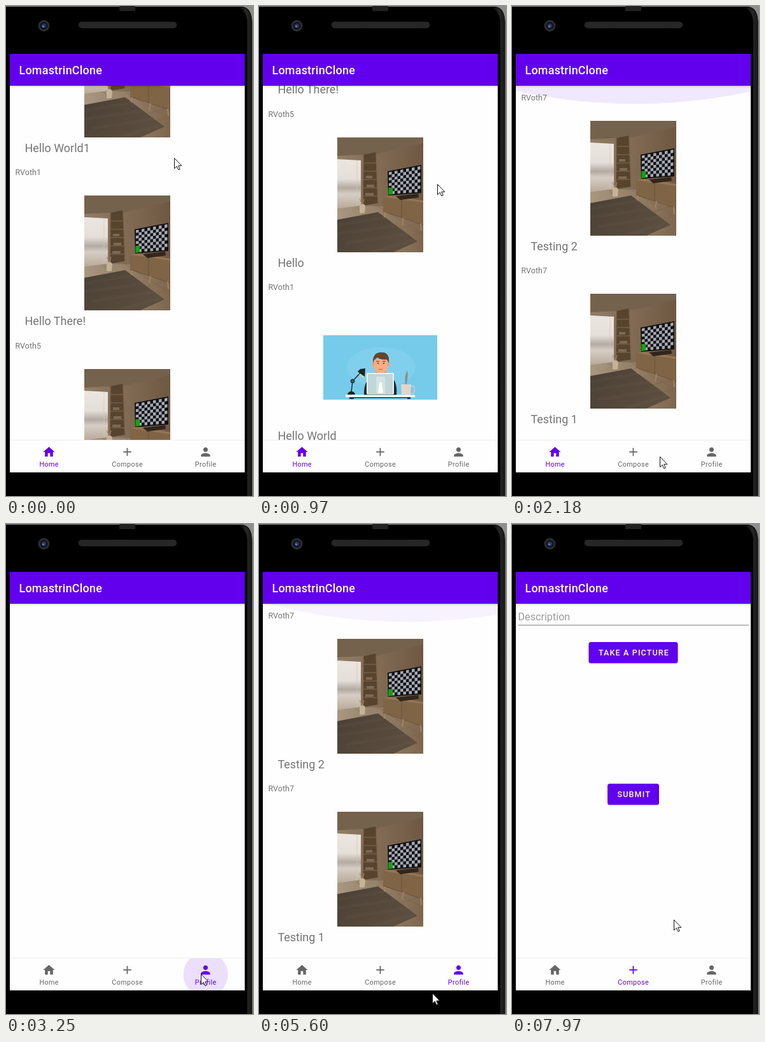
Animation, 388 px wide and 768 px high, one loop 8 s. Source, as an HTML page:

```html
<!DOCTYPE html>
<html lang="en">
<head>
<meta charset="utf-8">
<title>Phone feed</title>
<style>
html, body { margin: 0; width: 100%; height: 100%; overflow: hidden; background: #000; }
svg { display: block; }
text { font-family: Roboto, sans-serif; fill: #757575; }
.user { font-size: 12.57px; }
.desc { font-size: 17.95px; }
.label { font-size: 10.8px; letter-spacing: .36px; text-anchor: middle; fill: inherit; }
.btn { font-size: 12.57px; font-weight: 500; letter-spacing: 1.12px; fill: #fff; }
</style>
</head>
<body>
<svg id="stage" width="388" height="768" viewBox="0 0 388 768">
  <defs>
    <clipPath id="listClip"><rect x="6" y="125" width="369" height="556"/></clipPath>
    <clipPath id="navClip"><rect x="6" y="681" width="369" height="50"/></clipPath>
    <clipPath id="roomClip"><rect width="135" height="180"/></clipPath>
    <linearGradient id="wall"><stop offset="0" stop-color="#927d66"/><stop offset="1" stop-color="#6f5842"/></linearGradient>
    <linearGradient id="sky" x2="0" y2="1">
      <stop offset="0" stop-color="#ebe6df"/><stop offset=".4" stop-color="#e4dfd8"/>
      <stop offset=".58" stop-color="#b3aaa1"/><stop offset=".7" stop-color="#d6cec5"/><stop offset="1" stop-color="#b8a997"/>
    </linearGradient>
    <linearGradient id="floor"><stop offset="0" stop-color="#a99780"/><stop offset="1" stop-color="#7e664e"/></linearGradient>
    <linearGradient id="rug" x2="1" y2=".4"><stop offset="0" stop-color="#4a4035"/><stop offset="1" stop-color="#5c4e3f"/></linearGradient>
    <linearGradient id="edge"><stop offset="0" stop-color="#000"/><stop offset=".6" stop-color="#272727"/><stop offset="1" stop-color="#161616"/></linearGradient>
    <linearGradient id="shade" x2="0" y2="1"><stop offset="0" stop-opacity=".16"/><stop offset="1" stop-opacity="0"/></linearGradient>
    <pattern id="mesh" width="4" height="4" patternUnits="userSpaceOnUse">
      <rect width="4" height="4" fill="#2b2b2b"/><circle cx="1" cy="1" r=".7" fill="#111"/><circle cx="3" cy="3" r=".7" fill="#111"/>
    </pattern>

    <g id="room" clip-path="url(#roomClip)">
      <rect width="135" height="180" fill="url(#wall)"/>
      <path d="M0 0H135V9L64 26 0 29Z" fill="#75624d"/>
      <path d="M0 34L37 36V107L0 112Z" fill="url(#sky)"/>
      <path d="M31 36V107" stroke="#cfc6bc" stroke-width=".7"/>
      <path d="M41 27L61 23 64 103 40 107Z" fill="#57442f"/>
      <path d="M42 40H61M42 53H62M41 66H62M41 79H63M41 92H63" stroke="#86694c"/>
      <path d="M41 27L40 107M61 23L64 103" stroke="#806449" stroke-width="1.5"/>
      <path d="M45 62h10M46 76h12M44 89h13" stroke="#7b6a56" stroke-width="4"/>
      <path d="M0 112L40 107 72 108 135 135V180H0Z" fill="url(#floor)"/>
      <path d="M64 108L135 152M30 109L96 180M98 143L135 132M110 155L135 148" stroke="#786149" stroke-width=".6"/>
      <path d="M0 129L64 117 126 163 88 180H0Z" fill="url(#rug)"/>
      <path d="M0 138L75 125M0 151L95 138M12 166L110 151M54 180L121 160" stroke="#75665422" stroke-width="5"/>
      <path d="M72 93L84 91 135 99V136L130 134 72 116Z" fill="#7f6446"/>
      <path d="M72 93L84 91 135 99V102Z" fill="#957654"/>
      <path d="M101 97V126M72 116L135 137" stroke="#624a32" stroke-width=".8"/>
      <path d="M75 117L74 125M104 126L102 137M131 135L132 146" stroke="#a3845f" stroke-width="2"/>
      <path d="M35 108q0-4 4-4t5 4l-1 10q-4 2-8 0z" fill="#c5b398"/>
      <path d="M39 105L35 96M40 105L42 96" stroke="#a18b70"/>
      <path d="M92 92L127 88 128 94 99 98Z" fill="#30261d"/>
      <path d="M79 53L132 43V87L80 91Z" fill="#111"/>
      <path id="checks" fill="#a5a9b6"/>
      <path d="M80.500 79L87 78.500V89L80.500 90Z" fill="#12a512"/>
    </g>

    <g id="worker">
      <rect width="179" height="101" fill="#76cbea"/>
      <ellipse cx="91" cy="50" rx="54" ry="31" fill="#80d0ed"/>
      <path d="M64 94Q63 69 80 63L90 60 102 63Q117 68 115 94Z" fill="#24252b"/>
      <path d="M82 60L90 66 99 60V53H82Z" fill="#e99468"/>
      <path d="M79 37H102V49Q100 59 90 60 81 59 79 48Z" fill="#f8ad83"/>
      <circle cx="79" cy="46" r="2.500" fill="#f3a176"/><circle cx="102" cy="46" r="2.500" fill="#f3a176"/>
      <path d="M78 44Q77 29 88 27 101 25 103 36V44L100 38Q91 39 85 35L80 39Z" fill="#65452f"/>
      <path d="M83 41h5M93 41h5" stroke="#5a3b29"/>
      <circle cx="86" cy="44" r="1" fill="#2a2a2a"/><circle cx="95" cy="44" r="1" fill="#2a2a2a"/>
      <path d="M87 53q3 2 6 0" stroke="#b55b45" fill="none"/>
      <rect x="68" y="59" width="43" height="34" rx="2" fill="#edf4f4"/>
      <rect x="70" y="61" width="39" height="32" rx="1" fill="#c0d6d8"/>
      <path d="M83 65H97V91H83Z" fill="#d3e4e5"/>
      <path d="M86 91L88 75Q90 72 92 75L94 91Z" fill="#fff"/>
      <rect x="35" y="93.500" width="109" height="3.500" fill="#fff"/>
      <path d="M41 97H137V100H132V98.500H48V100H41Z" fill="#26323b"/>
      <path d="M38 93Q39 88 44 88T50 93Z" fill="#222"/>
      <path d="M44 89L46 72 59 58" stroke="#222" stroke-width="1.500" fill="none"/>
      <circle cx="46" cy="72" r="3" fill="#31566a" stroke="#222"/>
      <path d="M54 57L58 53 66 52 65 65Z" fill="#222"/>
      <path d="M55 60L64 65 62 67Z" fill="#f6d680"/>
      <path d="M129 78Q127 63 132 55 134 65 130 78Z" fill="#8a8d8b"/>
      <path d="M138 80h3q2 0 2 3v6q0 2-5 2" fill="none" stroke="#dbcabe" stroke-width="1.500"/>
      <path d="M122 77H138L137 93H123Z" fill="#e4d5ca"/>
    </g>
  </defs>

  <rect width="388" height="768" fill="#8d8d8d"/>
  <path d="M0 1H372Q386 4 386.500 24V768H0Z"/>
  <path d="M370 1Q386 5 386.500 26V768H379V26Q379 9 364 1Z" fill="url(#edge)"/>
  <rect x="178" width="25" height="8" rx="1" fill="#222"/>
  <circle cx="59.500" cy="31" r="9" fill="#2d2d2e"/>
  <circle cx="59.500" cy="31" r="6" fill="#11131d"/>
  <circle cx="59.500" cy="31" r="3.600" fill="#253465"/>
  <circle cx="58.500" cy="32" r="1.400" fill="#7187c9"/>
  <rect x="114" y="25" width="154" height="9.500" rx="4.700" fill="url(#mesh)" stroke="#333" stroke-width=".5"/>

  <rect x="6" y="75" width="369" height="656" fill="#fefefe"/>
  <g clip-path="url(#listClip)">
    <g id="list"></g>
    <circle id="glow" cy="-706.500" r="860" fill="#6200ee"/>
  </g>

  <g id="compose">
    <text x="9.500" y="151" font-size="16.160" style="fill:#9b9b9b">Description</text>
    <path d="M9.500 158.500H372" stroke="#868686"/>
    <g id="buttons"></g>
  </g>

  <rect x="6" y="125" width="369" height="3" fill="url(#shade)"/>
  <rect x="6" y="75" width="369" height="50" fill="#6200ee"/>
  <text x="20.500" y="107" font-size="17.950" font-weight="500" letter-spacing=".22" style="fill:#fff">LomastrinClone</text>

  <rect x="6" y="680" width="369" height="51" fill="#fefefe"/>
  <path d="M6 680.500H375" stroke="#ededed"/>
  <g clip-path="url(#navClip)"><circle id="ripple" cy="706" r="61" fill="#6200ee"/></g>
  <g id="nav"></g>

  <path id="cursor" d="M.5 .5V16.800L4.300 13.200 6.800 18.800 9.200 17.800 6.800 12.300H11.800Z" fill="#fff" stroke="#111"/>
</svg>
<script>
const $ = id => document.getElementById(id);
const LOOP = 8000, STEP = 137, LEAD = 40, PITCH = 271.4;
const PROFILE_TAP = 24, LOADED = 28, COMPOSE_TAP = 54;

const part = (k, a, b) => Math.min(1, Math.max(0, (k - a) / (b - a)));
const smooth = p => p * p * (3 - 2 * p);
const easeOut = p => 1 - (1 - p) ** 3;

// Pointer strokes: [tick, x, y]
const STROKES = [[0,264,238],[3,278,520],[7,280,279],[10,264,483],[16,232,706],[22,306,705],[27,306,705],
  [33,297,513],[36,292,290],[41,272,735],[52,205,704],[54,205,704],[56,220,752],[58,254,620]];

function pointer(k) {
  const i = Math.max(1, STROKES.findIndex(s => s[0] >= k));
  const [a, ax, ay] = STROKES[i - 1], [b, bx, by] = STROKES[i];
  const p = smooth(part(k, a, b));
  return [ax + (bx - ax) * p, ay + (by - ay) * p];
}

// Fling down, fling back to the top, then a drag there and back.
const scroll = k => 696.7 + 363.8 * easeOut(part(k, 0, 8)) - 1060.5 * smooth(part(k, 10, 16))
  + 240 * Math.sin(Math.PI * part(k, 33, 40)) ** 2;

// Overscroll light: quick rise, slow fade.
const pulse = (k, start, len) => k <= start ? 0 : 1 - part(k, start + 1, start + len);
const glow = k => .085 * pulse(k, 15, 5) + .06 * pulse(k, 39, 5);

function checker(cols, rows) {
  const pt = (c, r) => {
    const u = c / cols, top = 54.5 - 9.5 * u, bottom = 89 - 3.5 * u;
    return (81 + 49.5 * u).toFixed(1) + ' ' + (top + (bottom - top) * r / rows).toFixed(1);
  };
  let d = '';
  for (let r = 0; r < rows; r++)
    for (let c = r % 2; c < cols; c += 2)
      d += `M${pt(c, r)}L${pt(c + 1, r)} ${pt(c + 1, r + 1)} ${pt(c, r + 1)}Z`;
  return d;
}
$('checks').setAttribute('d', checker(11, 8));

const posts = [['RVoth7','Testing 2'],['RVoth7','Testing 1'],['RVoth7','Hello World1'],
  ['RVoth1','Hello There!'],['RVoth5','Hello'],['RVoth1','Hello World']];
$('list').innerHTML = posts.map(([user, desc], i) => {
  const pic = i === 5 ? '<use href="#worker" x="101" y="219"/>' : '<use href="#room" x="123" y="180"/>';
  return `<g><text class="user" x="14.500" y="148">${user}</text>
    ${pic}<text class="desc" x="29.500" y="383">${desc}</text></g>`;
}).join('');
const cards = [...$('list').children];

const button = (x, y, w, label) =>
  `<rect x="${x}" y="${y + 1.5}" width="${w}" height="33" rx="3.500" opacity=".2"/>
   <rect x="${x}" y="${y}" width="${w}" height="33" rx="3.500" fill="#6200ee"/>
   <text class="btn" x="${x + 15.5}" y="${y + 21}">${label}</text>`;
$('buttons').innerHTML = button(120.5, 185, 140, 'TAKE A PICTURE') + button(150, 407, 81, 'SUBMIT');

const tabs = [
  ['Home', 'M10 20v-6h4v6h5v-8h3L12 3 2 12h3v8z'],
  ['Compose', 'M19 13h-6v6h-2v-6H5v-2h6V5h2v6h6z'],
  ['Profile', 'M12 12c2.210 0 4-1.790 4-4s-1.790-4-4-4-4 1.790-4 4 1.790 4 4 4zm0 2c-2.670 0-8 1.340-8 4v2h16v-2c0-2.660-5.330-4-8-4z']
];
const tabX = i => 67.5 + 123 * i;
$('nav').innerHTML = tabs.map(([name, d], i) =>
  `<g><path transform="translate(${tabX(i) - 10.8} 688.2) scale(.898)" d="${d}"/>
   <text class="label" x="${tabX(i) + .2}" y="722">${name}</text></g>`).join('');
const tabEls = [...$('nav').children];

const set = (el, name, value) => el.setAttribute(name, value);
const show = (el, on) => set(el, 'display', on ? 'inline' : 'none');

function draw(ms) {
  const k = Math.floor((ms + LEAD) / STEP);
  const tab = k < PROFILE_TAP ? 0 : k < COMPOSE_TAP ? 2 : 1;
  const [x, y] = pointer(k);

  show($('list'), tab === 0 || (tab === 2 && k >= LOADED));
  show($('compose'), tab === 1);
  cards.forEach((card, i) => {
    show(card, tab === 0 || i < 3);
    set(card, 'transform', `translate(0 ${Math.round(i * PITCH - scroll(k))})`);
  });
  set($('glow'), 'cx', x - 39);
  set($('glow'), 'opacity', glow(k));

  tabEls.forEach((el, i) => set(el, 'fill', i === tab ? '#6200ee' : '#666'));
  const age = k - (tab === 2 ? PROFILE_TAP : COMPOSE_TAP);
  set($('ripple'), 'cx', tabX(tab));
  set($('ripple'), 'r', 35 + 26 * part(age, 0, 2));
  set($('ripple'), 'opacity', tab ? .12 * (1 - part(age, 0, 3)) : 0);

  set($('cursor'), 'transform', `translate(${Math.round(x)} ${Math.round(y)})`);
}

function frame() {
  draw(performance.now() % LOOP);
  requestAnimationFrame(frame);
}
frame();
</script>
</body>
</html>
```
